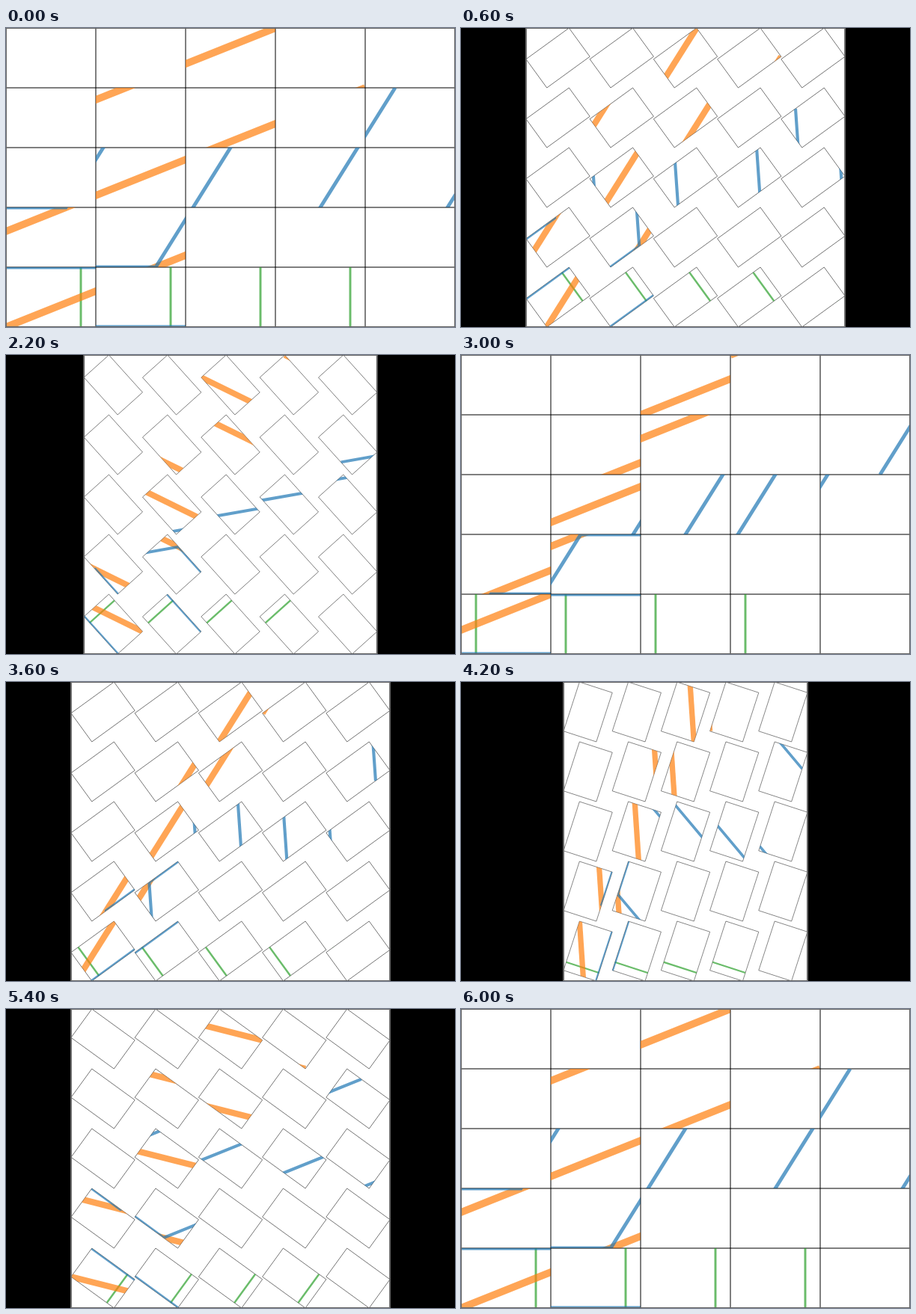
An HTML page with a canvas that plays this animation: 600 by 400 pixels, repeating every 6.2 s.

```html
<!DOCTYPE html>
<html>
<head>
<meta charset="utf-8">
<title>Turning tiles</title>
<style>
html, body { margin: 0; width: 100%; height: 100%; overflow: hidden; background: #000; }
canvas { display: block; }
</style>
</head>
<body>
<canvas id="stage" width="600" height="400"></canvas>
<script>
const ctx = document.getElementById('stage').getContext('2d');
const STEP = 200, STEPS = 31, N = 5, TW = 120, TH = 80, W = 600, H = 400;

// One 600 x 400 chart, y pointing up, bottom curve first.
const curves = [
  { color: '#2ca02c', width: 0.006, points: [[100, 0], [100, 320]] },
  { color: '#ff7f0e', width: 0.02, points: [[0, 0], [600, 240]] },
  { color: '#1f77b4', width: 0.01, points: [[0, 80], [200, 80], [400, 400]] }
];

// Cuts the chart into tiles and swaps its axes: chart rows become stage columns.
function drawTile(row, col, unit) {
  ctx.globalAlpha = 0.6;
  ctx.strokeStyle = '#000';
  ctx.lineWidth = 0.002 * unit;
  ctx.strokeRect(0, 0, TW, TH);

  ctx.beginPath();
  ctx.rect(0, 0, TW, TH);
  ctx.clip();
  ctx.translate(-(N - 1 - row) * TW, (col + 1) * TH);
  ctx.scale(1, -1);
  ctx.globalAlpha = 0.7;
  for (const { color, width, points } of curves) {
    ctx.beginPath();
    points.forEach(p => ctx.lineTo(...p));
    ctx.strokeStyle = color;
    ctx.lineWidth = width * unit;
    ctx.stroke();
  }
}

function draw(step) {
  const angle = -step * Math.PI / 15;
  const c = Math.abs(Math.cos(angle)), s = Math.abs(Math.sin(angle));

  // Fit the grid of rotated bounding boxes to the stage height.
  const cellH = H / N;
  const scale = cellH / (TW * s + TH * c);
  const cellW = (TW * c + TH * s) * scale;
  const width = cellW * N, left = (W - width) / 2;
  const unit = Math.sqrt(width * H) / scale;

  ctx.fillStyle = '#000';
  ctx.fillRect(0, 0, W, H);
  ctx.fillStyle = '#fff';
  ctx.fillRect(left, 0, width, H);

  for (let row = 0; row < N; row++) {
    for (let col = 0; col < N; col++) {
      ctx.save();
      ctx.translate(left + (col + 0.5) * cellW, (row + 0.5) * cellH);
      ctx.rotate(angle);
      ctx.scale(scale, scale);
      ctx.translate(-TW / 2, -TH / 2);
      drawTile(row, col, unit);
      ctx.restore();
    }
  }

  ctx.strokeStyle = '#666';
  ctx.lineWidth = 2;
  ctx.strokeRect(left, 0, width, H);
}

const start = performance.now();
function tick() {
  draw(Math.floor((performance.now() - start) / STEP) % STEPS);
  requestAnimationFrame(tick);
}
tick();
</script>
</body>
</html>
```
